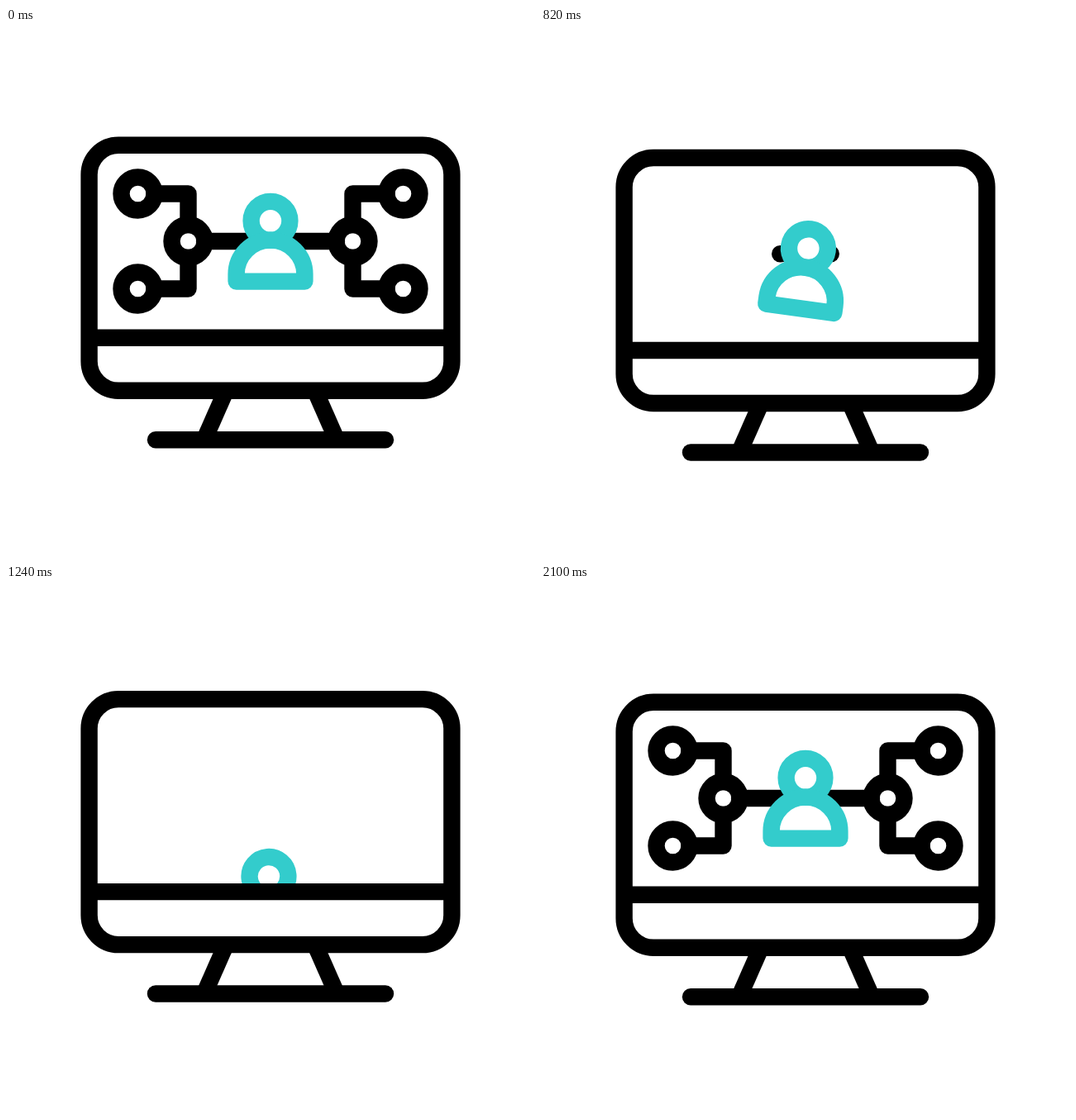
Write an HTML page with a canvas that moves like this. It is 640 by 640 pixels and loops after 2.58 s.

```html
<!DOCTYPE html>
<html lang="en">
<head>
<meta charset="utf-8">
<style>
  html, body { margin: 0; width: 100%; height: 100%; overflow: hidden; background: #fff; }
  canvas { display: block; width: 100vmin; height: 100vmin; }
</style>
</head>
<body>
<canvas id="stage" width="640" height="640"></canvas>
<script>
const LOOP = 2580, STEP = 20, MIRROR = 2200;
const INK = '#000', TEAL = '#33cccc';
const ctx = document.getElementById('stage').getContext('2d');

const clamp = u => Math.min(1, Math.max(0, u));
const ease = u => (1 - Math.cos(Math.PI * u)) / 2;
const ramp = (t, a, b) => ease(clamp((t - a) / (b - a)));

// Eased value through [time, value] keys
function track(t, keys) {
  let v = keys[0][1];
  for (let i = 1; i < keys.length; i++) {
    v += (keys[i][1] - keys[i - 1][1]) * ramp(t, keys[i - 1][0], keys[i][0]);
  }
  return v;
}

// How much of a link is drawn: retracts early, grows back later
const shown = (t, out0, out1, in0, in1) =>
  t < 1100 ? 1 - ramp(t, out0, out1) : ramp(t, in0, in1);

const monitorShift = t => track(t, [[710, 0], [908, 26], [1095, -25.5], [1288, 0]]);

function personPose(t) {
  const late = t > 1100;
  const s = late ? MIRROR - t : t;
  const crouch = 19 * ramp(s, 560, 760);
  const leap = 93 * Math.pow(Math.max(0, s - 760) / 180, 4);
  const dy = crouch - leap;
  const tilt = track(s, [[560, 0], [760, 9.6], [1100, -12.9]]);
  return { dy: late ? -dy : dy, tilt: tilt * Math.PI / 180 };
}

function pen(color, cap) {
  ctx.strokeStyle = color;
  ctx.lineWidth = 20.4;
  ctx.lineCap = cap;
  ctx.lineJoin = 'round';
}

// Stroke the last part of a polyline, ending at its final point
function tail(pts, part) {
  if (part <= 0) return;
  const seg = i => Math.hypot(pts[i][0] - pts[i - 1][0], pts[i][1] - pts[i - 1][1]);
  let left = 0;
  for (let i = 1; i < pts.length; i++) left += seg(i);
  left *= part;
  ctx.beginPath();
  ctx.moveTo(...pts[pts.length - 1]);
  for (let i = pts.length - 1; i > 0 && left > 0; i--) {
    const len = seg(i), k = Math.min(1, left / len);
    const [x, y] = pts[i], [px, py] = pts[i - 1];
    ctx.lineTo(x + (px - x) * k, y + (py - y) * k);
    left -= len;
  }
  ctx.stroke();
}

// Ring that opens on its left side and shrinks to a dot on its right
function ring(x, y, part) {
  if (part <= 0) return;
  const half = Math.max(0.004, Math.PI * part);
  ctx.beginPath();
  ctx.arc(x, y, 20, -half, half);
  ctx.stroke();
}

function network(t) {
  const outer = shown(t, 20, 240, 1880, 2100);
  const elbow = shown(t, 200, 500, 1740, 1960);
  const inner = shown(t, 334, 735, 1560, 1800);
  const link = shown(t, 636, 836, 1420, 1650);
  pen(INK, 'round');
  for (const flip of [1, -1]) {
    ctx.save();
    ctx.translate(320, 258);
    ctx.scale(flip, 1);
    tail([[-80, 0], [-30, 0]], link);
    ring(-99.5, 0, inner);
    for (const side of [-1, 1]) {
      const y = 57.5 * side;
      tail([[-140.5, y], [-99.5, y], [-99.5, 20 * side]], elbow);
      ring(-160.5, y, outer);
    }
    ctx.restore();
  }
}

function person(t) {
  const { dy, tilt } = personPose(t);
  ctx.save();
  ctx.beginPath();
  ctx.rect(110, 151, 420, 215);
  ctx.clip();
  ctx.translate(320, 258 + dy);
  ctx.rotate(tilt);
  pen(TEAL, 'round');
  ctx.beginPath();
  ctx.arc(0, -24.7, 23.4, 0, Math.PI * 2);
  ctx.stroke();
  ctx.beginPath();
  ctx.moveTo(-41.4, 48.6);
  ctx.arc(0, 40, 41.4, Math.PI, 0);
  ctx.lineTo(41.4, 48.6);
  ctx.closePath();
  ctx.stroke();
  ctx.restore();
}

function line(x1, y1, x2, y2) {
  ctx.beginPath();
  ctx.moveTo(x1, y1);
  ctx.lineTo(x2, y2);
  ctx.stroke();
}

function monitor() {
  pen(INK, 'butt');
  ctx.beginPath();
  ctx.roundRect(100.6, 141.8, 438.8, 297, 35.5);
  ctx.stroke();
  line(100, 374.8, 540, 374.8);
  line(265.5, 440, 241.5, 494.5);
  line(374.5, 440, 398.5, 494.5);
  pen(INK, 'round');
  line(181, 498.2, 459, 498.2);
}

function draw(t) {
  ctx.fillStyle = '#fff';
  ctx.fillRect(0, 0, 640, 640);
  ctx.save();
  ctx.translate(0, monitorShift(t));
  network(t);
  person(t);
  monitor();
  ctx.restore();
}

const start = performance.now();
function tick() {
  const t = (performance.now() - start) % LOOP;
  draw(Math.floor(t / STEP) * STEP);
  requestAnimationFrame(tick);
}
tick();
</script>
</body>
</html>
```
